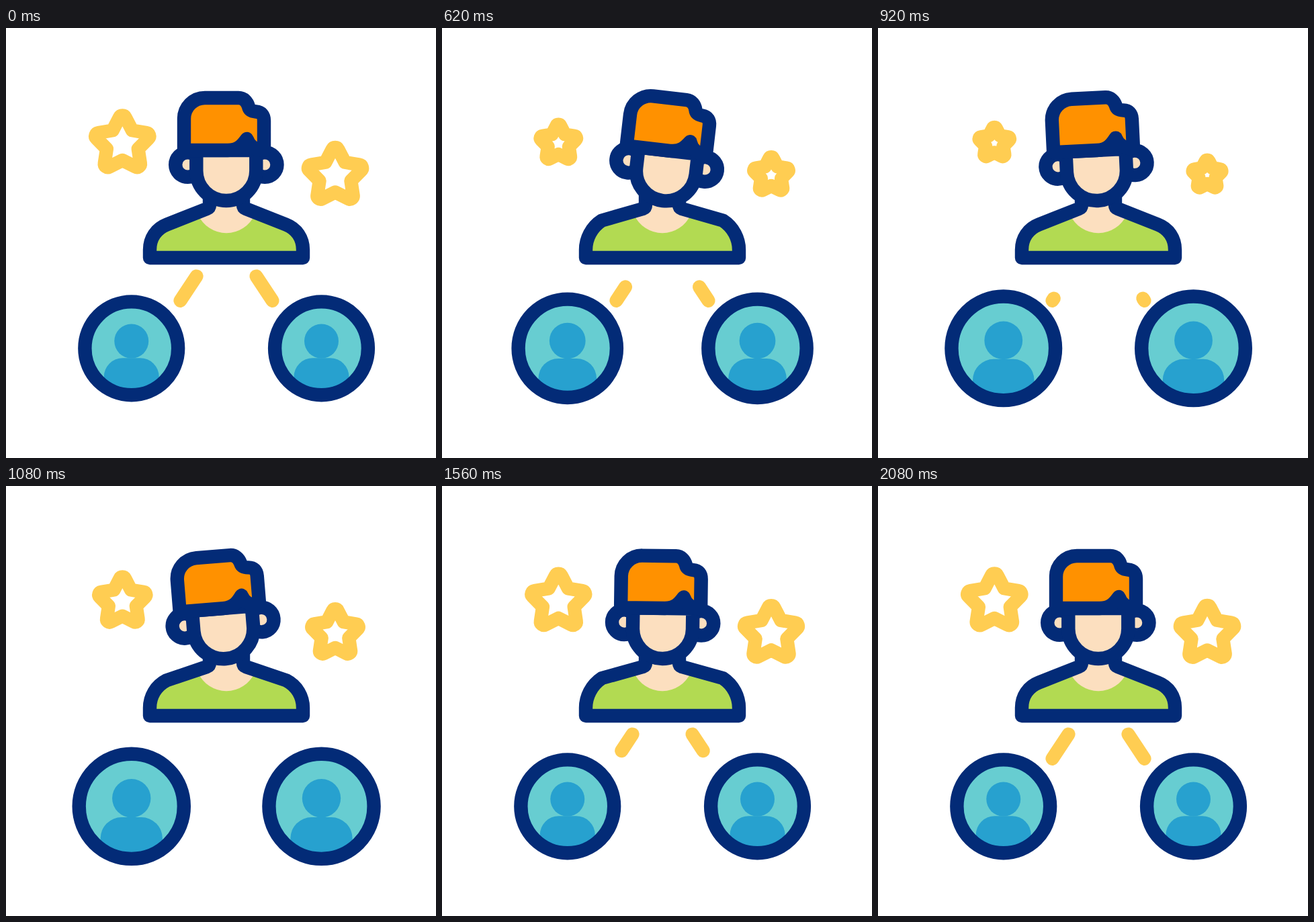
Write an HTML page that moves like this. It is 640 by 640 pixels and loops after 2100 ms.

```html
<!DOCTYPE html>
<html lang="en">
<head>
<meta charset="utf-8">
<title>Team leader</title>
<style>
  html, body { margin: 0; width: 100%; height: 100%; overflow: hidden; background: #fff; }
  svg { display: block; width: 100%; height: 100%; }
  .navy { stroke: #032b77; stroke-width: 20.4; stroke-linejoin: round; }
  .gold { fill: none; stroke: #ffcd52; stroke-width: 20.2; stroke-linecap: round; stroke-linejoin: round; }
  .navy, .gold { vector-effect: non-scaling-stroke; }
  .skin { fill: #fcdfbf; }
</style>
</head>
<body>
<svg viewBox="0 0 640 640">
  <defs>
    <clipPath id="disc"><circle r="69"/></clipPath>
    <g id="member">
      <circle r="69.4" fill="#67cdd1"/>
      <g fill="#27a1cf" clip-path="url(#disc)">
        <circle cy="-10.7" r="25.5"/>
        <rect x="-41" y="14.4" width="82" height="90" rx="28"/>
      </g>
      <circle r="69.4" class="navy" fill="none"/>
    </g>
    <path id="star" class="gold"/>
  </defs>

  <use href="#star" class="star"/>
  <use href="#star" class="star"/>
  <path class="gold link"/>
  <path class="gold link"/>
  <use href="#member" class="member"/>
  <use href="#member" class="member"/>

  <path class="torso" fill="#b2da52"/>
  <path class="skin" d="M286 278A46 46 0 0 0 370 278L343 266V245H313V266Z"/>
  <path class="torso navy" fill="none"/>

  <g id="head">
    <circle class="navy skin" cx="270.5" cy="203.5" r="18.3"/>
    <circle class="navy skin" cx="385.2" cy="203.5" r="18.3"/>
    <path class="navy skin" d="M283.3 182V212.5A44.5 44.5 0 0 0 372.3 212.5V182Z"/>
    <path class="navy" fill="#ff9100" d="M265 182V135A31 31 0 0 1 296 104H346C354 104 359 110 361 117C362 122 366 124 372 124.5C380 125 384 130 384 138V182C368 182 361 173 358.5 165C352 174 346 182 330 182Z"/>
  </g>
</svg>
<script>
const LOOP = 2100;
const all = s => [...document.querySelectorAll(s)];
const [stars, links, members, torso] = ['.star', '.link', '.member', '.torso'].map(all);
const head = document.getElementById('head');

// Keys are [time, value] pairs joined by a sine ease.
function ease(t, ...keys) {
  const i = keys.findIndex(k => k[0] > t);
  if (i === 0) return keys[0][1];
  if (i < 0) return keys[keys.length - 1][1];
  const [t0, v0] = keys[i - 1], [t1, v1] = keys[i];
  return v0 + (v1 - v0) * (1 - Math.cos(Math.PI * (t - t0) / (t1 - t0))) / 2;
}

// Five-pointed star with rounded tips
function starPath(R, r, round) {
  const at = (d, a) => [d * Math.sin(a), 2 - d * Math.cos(a)];
  const mix = (p, q, k) => p.map((v, i) => v + (q[i] - v) * k);
  const step = Math.PI / 5;
  let d = '';
  for (let i = 0; i < 10; i += 2) {
    const tip = at(R, i * step), a = at(r, (i - 1) * step), b = at(r, (i + 1) * step);
    d += `${d ? 'L' : 'M'}${a}L${mix(tip, a, .31)}A${round} ${round} 0 0 1 ${mix(tip, b, .31)}`;
  }
  return d + 'Z';
}
document.getElementById('star').setAttribute('d', starPath(47.8, 24.6, 5));

function torsoPath(p) {
  const curve = [214, 313 + p, 223.5 - 1.5 * p, 298.6 - 2 * p, 239.5 - 1.5 * p, 292.5 - 6.5 * p];
  const flip = x => 656 - x;
  const [a, b, c, d, e, f] = curve;
  return `M303 246V263Q303 267.5 299 269L${e} ${f}C${c} ${d} ${a} ${b} 214 330V342H442V330` +
    `C${flip(a)} ${b} ${flip(c)} ${d} ${flip(e)} ${f}L357 269Q353 267.5 353 263V246`;
}

const place = (el, x, y, s) => el.setAttribute('transform', `translate(${x} ${y}) scale(${s})`);

function draw(t) {
  const shrink = ease(t, [90, 0], [890, 1], [1195, -.04], [1480, .01], [2060, 0]);
  place(stars[0], 173.3, 170.3, 1 - .447 * shrink);
  place(stars[1], 490, 217.8, 1 - .48 * shrink);

  const size = ease(t, [230, 1], [1085, 1.125], [1240, .9], [1500, 1]);
  place(members[0], 186.75, 476.8, size);
  place(members[1], 469.5, 476.8, size);

  // Links retract downwards, then grow back from the top with one bounce.
  const gone = t < 1090;
  const from = gone ? ease(t, [220, 0], [1090, 1]) : 0;
  const to = gone ? 1 : ease(t, [1090, 0], [1320, 1], [1510, .62], [1710, 1]);
  links.forEach((el, i) => {
    const dir = i ? 1 : -1;
    const pt = k => `${328 + dir * (44.5 + 24 * k)} ${369.5 + 36.3 * k}`;
    el.setAttribute('d', to - from > .01 ? `M${pt(from)}L${pt(to)}` : '');
  });

  const lift = ease(t, [100, 0], [460, 1], [560, 1], [920, 0], [1250, 1], [1550, 1], [2060, 0]);
  torso.forEach(el => el.setAttribute('d', torsoPath(lift)));

  const tilt = ease(t, [100, 0], [685, 6.8], [1020, -5.2], [1377, 2.4], [1750, -.9], [2080, 0]);
  head.setAttribute('transform', `rotate(${tilt} 328 262)`);
}

function frame() {
  draw(performance.now() % LOOP);
  requestAnimationFrame(frame);
}
frame();
</script>
</body>
</html>
```
